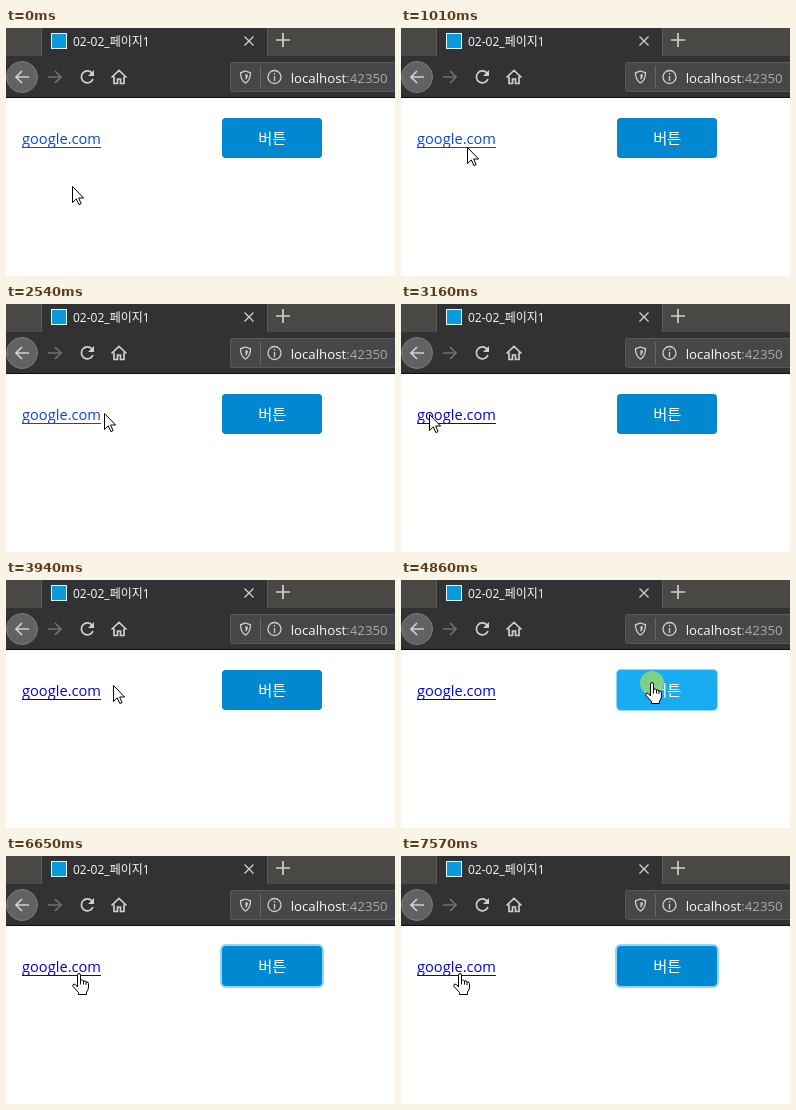
These frames come from a looping animation (389x248 px, 8 s). An HTML page:

```html
<!DOCTYPE html>
<html lang="ko">
<head>
<meta charset="utf-8">
<title>Link and button</title>
<style>
  html, body { margin: 0; width: 100%; height: 100%; overflow: hidden; background: #fff; }
  svg { display: block; width: 389px; height: 248px; }
  text { font-family: "Open Sans", "Noto Sans CJK KR", "Noto Sans CJK", "Noto Sans", sans-serif; }
  .icon { fill: none; stroke: #d0d0d2; stroke-width: 1.7; }
  .thin { stroke-width: 1.3; }
</style>
</head>
<body>
<svg viewBox="0 0 389 248">
  <rect width="389" height="248" fill="#fff"/>

  <!-- tab strip -->
  <rect width="389" height="28" fill="#4a4845"/>
  <rect x="36" width="225" height="28" fill="#323234"/>
  <path d="M35.5 0V28M261.5 0V28" stroke="#5c5a58"/>
  <rect x="45.5" y="5.5" width="15" height="15" fill="#0a9bdc" stroke="#e8f6fc"/>
  <text x="67" y="17.5" font-size="12" fill="#f9f9fa">02-02_페이지1</text>
  <path class="icon thin" d="M238.5 8.5l9 9m0-9l-9 9"/>
  <path class="icon" d="M270 12h14m-7-7v14"/>

  <!-- toolbar -->
  <rect y="28" width="389" height="41" fill="#323234"/>
  <rect y="69" width="389" height="1" fill="#0e0e10"/>
  <circle cx="16" cy="49" r="15.5" fill="#626264" stroke="#7a7a7c"/>
  <path class="icon" d="M23 49H10m6-6l-6 6 6 6"/>
  <path class="icon" d="M42 49h13m-6-6l6 6-6 6" style="stroke:#707072"/>
  <path class="icon" d="M86 45a6 6 0 1 0 1 6"/>
  <path d="M88 42v6h-6z" fill="#d0d0d2"/>
  <path class="icon" d="M105.5 49.5l7.500-7 7.500 7M108 48.5v7h3.500v-4.500h3v4.500h3.500v-7"/>
  <rect x="224.5" y="34.5" width="170" height="29" rx="2" fill="#474749" stroke="#59595b"/>
  <path class="icon thin" d="M239.5 43l5 1.800q0 7.500-5 10.200-5-2.700-5-10.200z"/>
  <path d="M239.5 46v6q2.500-2 2.500-5.200z" fill="#d0d0d2"/>
  <path d="M254.5 38V60" stroke="#69696b"/>
  <circle class="icon thin" cx="268.5" cy="49" r="6.500"/>
  <path class="icon thin" d="M268.5 48v5m0-8v1.500"/>
  <text x="284.7" y="54.7" font-size="13.25" fill="#f9f9fa">localhost<tspan fill="#aaaaac">:42350</tspan></text>

  <!-- page -->
  <g id="link">
    <text x="16" y="116" font-size="14.65">google.com</text>
    <path d="M16 119.5H95" stroke="currentColor"/>
  </g>
  <rect id="ring" fill="#8cd8ff"/>
  <rect id="button" x="216" y="90" width="100" height="40" rx="4"/>
  <text x="266.3" y="115.5" font-size="15.3" fill="#fff" text-anchor="middle">버튼</text>
  <circle id="press" cx="251" cy="103" r="12" fill="#88d17c" opacity=".95"/>

  <g id="cursor" fill="#fff" stroke="#000" stroke-linejoin="round">
    <path id="arrow" d="M.5 .5V16.5L4.3 12.9 6.9 18.6 9.1 17.6 6.6 12H11.6Z"/>
    <path id="hand" transform="translate(-7)" d="M5.5 14V2.2Q5.5 .5 7 .5T8.5 2.2V7Q11 6.5 11.5 8 13.5 7.3 14 9 16.5 8.6 16.5 10.5V14Q16.5 17 14.5 19V21.5H6.5V19.5L1 13.5Q.3 11.5 2 11 3.5 11 5.5 14ZM8.5 7V11.5M11.5 8V11.5M14 9V12"/>
  </g>
</svg>
<script>
const LOOP = 8000;
const BEAT = 75; // the pointer is redrawn once per beat
const $ = id => document.getElementById(id);
const clamp = (v, lo, hi) => Math.max(lo, Math.min(hi, v));
const point = (x, y) => ({ x, y });

const start = point(66, 158);
const onLink = point(66, 108);
const underLink = point(66, 125);
const underStart = point(41, 126);
const linkLeft = point(14, 110);
const linkRight = point(98, 109);
const gap = point(107, 105);
const onButton = point(251, 102);
const buttonLeft = point(237, 108);
const middle = point(149, 135);
const linkEdge = point(73, 117);
const below = point(58, 148);
const linkEnd = point(59, 117);

// bow bends the straight path vertically
const move = (at, beats, to, bow = 0) => ({ at, beats, to, bow });
const moves = [
  move(470, 4, onLink),
  move(930, 3, underLink),
  move(1240, 7, underStart, -40),
  move(2080, 2, linkLeft),
  move(2235, 5, linkRight),
  move(2850, 6, linkLeft),
  move(3390, 2, gap),
  move(4015, 3, onButton),
  move(5970, 1, buttonLeft),
  move(6040, 4, middle, 18),
  move(6480, 3, linkEdge),
  move(7030, 3, below),
  move(7420, 3, linkEnd)
];

function pointerAt(t) {
  return moves.filter(m => m.at <= t).reduce((from, { at, beats, to, bow }) => {
    const p = clamp((Math.floor((t - at) / BEAT) + 1) / beats, 0, 1);
    return point(
      Math.round(from.x + (to.x - from.x) * p),
      Math.round(from.y + (to.y - from.y) * p + bow * Math.sin(Math.PI * p))
    );
  }, start);
}

const inside = ({ x, y }, l, t, r, b) => x >= l && x <= r && y >= t && y <= b;
const show = (id, on) => $(id).setAttribute("visibility", on ? "visible" : "hidden");
function set(id, attributes) {
  for (const name in attributes) $(id).setAttribute(name, attributes[name]);
}

function render(t) {
  const pointer = pointerAt(t);
  const clickAt = 4860;
  const pressed = t >= clickAt && t < clickAt + 2 * BEAT;
  const overButton = inside(pointer, 216, 90, 316, 130);
  const overLink = t > clickAt && inside(pointer, 16, 102, 95, 121);
  const spread = clamp(Math.floor((t - clickAt) / BEAT) + 1, 0, 2);
  const linkColor = t < 2850 ? "#0646e2" : "#0000e4";

  set("cursor", { transform: `translate(${pointer.x} ${pointer.y})` });
  show("hand", overButton || overLink);
  show("arrow", !overButton && !overLink);
  show("press", pressed);
  set("link", { fill: linkColor, color: linkColor });
  set("ring", {
    x: 216 - spread, y: 90 - spread, rx: 4 + spread,
    width: 100 + 2 * spread, height: 40 + 2 * spread
  });
  set("button", { fill: !overButton ? "#0288d1" : pressed ? "#1aacf3" : "#2bb8ff" });
}

const begin = performance.now();
function tick() {
  render((performance.now() - begin) % LOOP);
  requestAnimationFrame(tick);
}
tick();
</script>
</body>
</html>
```
